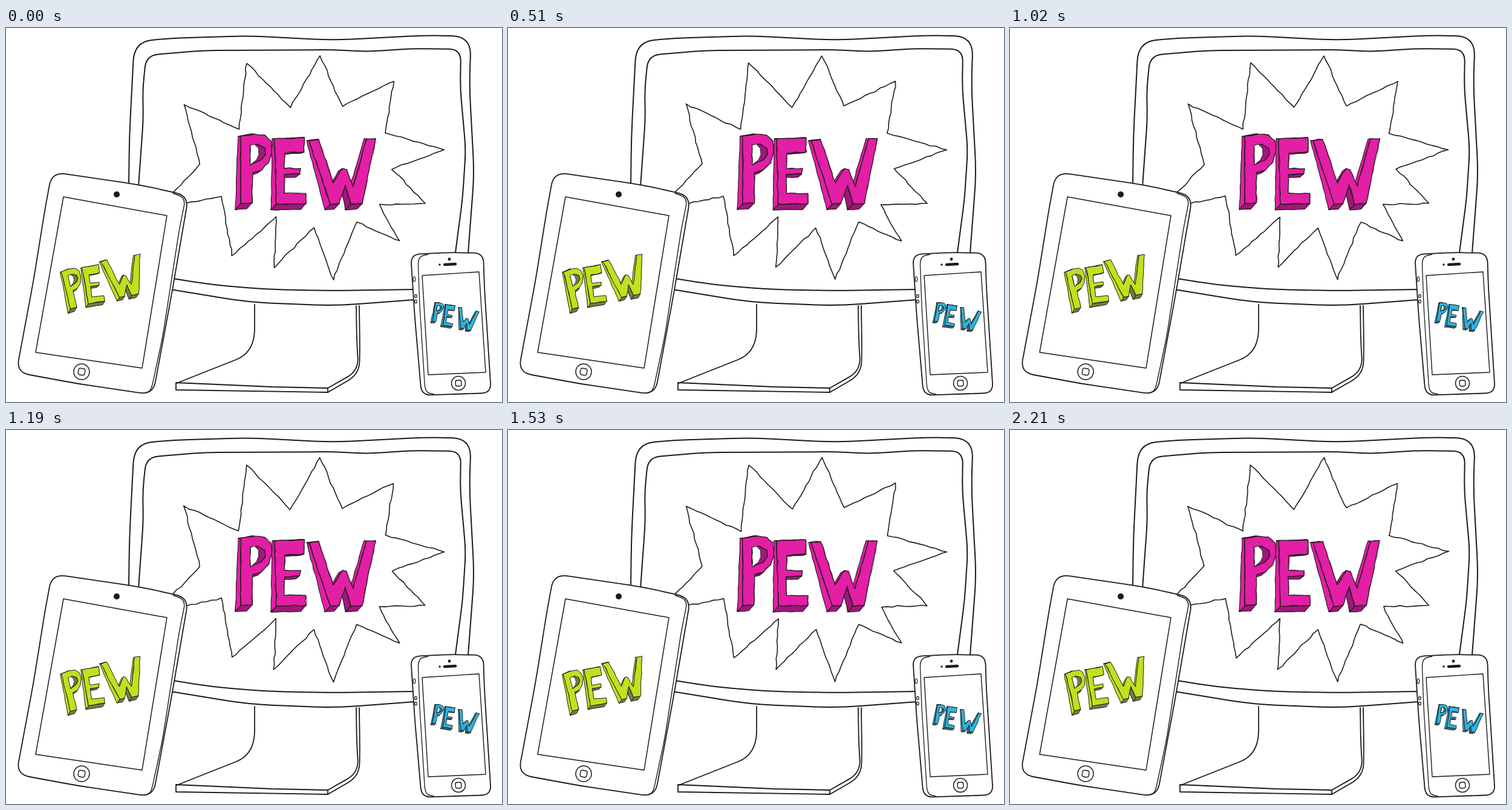
Recreate the animation shown at these times as an HTML page. Size 820 by 618 pixels, loop 2.38 s.

```html
<!DOCTYPE html>
<html lang="en">
<head>
<meta charset="utf-8">
<title>Pew</title>
<style>
  html, body { margin: 0; width: 100%; height: 100%; overflow: hidden; background: #fff; }
  svg { display: block; width: 100vw; height: 100vh; stroke-linejoin: round; stroke-linecap: round; }
</style>
</head>
<body>
<svg id="stage" viewBox="0 0 820 618" role="img" aria-label="PEW"></svg>
<script>
const STEP = 170, STEPS = 14, INK = '#1c1a1b';
const stage = document.getElementById('stage');

function add(tag, attrs) {
  const el = document.createElementNS('http://www.w3.org/2000/svg', tag);
  for (const k in attrs) el.setAttribute(k, attrs[k]);
  return stage.appendChild(el);
}

const parse = s => s.trim().split(/\s+/).map(p => p.split(',').map(Number));

function random(seed) {
  let a = Math.imul(seed + 1, 2654435761);
  return () => {
    a = (a + 0x6D2B79F5) | 0;
    let t = Math.imul(a ^ (a >>> 15), 1 | a);
    t = (t + Math.imul(t ^ (t >>> 7), 61 | t)) ^ t;
    return ((t ^ (t >>> 14)) >>> 0) / 4294967296 - 0.5;
  };
}

// Steady line through a few corners, each rounded by up to `radius`
function outline(points, radius, closed, width, fill = 'none') {
  const p = parse(points), n = p.length;
  const toward = (a, b) => {
    const len = Math.hypot(b[0] - a[0], b[1] - a[1]);
    const t = Math.min(radius / len, 0.5);
    return a.map((v, k) => (v + (b[k] - v) * t).toFixed(1));
  };
  let d = closed ? '' : `M${p[0]}`;
  for (let i = closed ? 0 : 1; i < (closed ? n : n - 1); i++) {
    const from = toward(p[i], p[(i + n - 1) % n]), to = toward(p[i], p[(i + 1) % n]);
    d += `${d ? 'L' : 'M'}${from}Q${p[i]} ${to}`;
  }
  d += closed ? 'Z' : `L${p[n - 1]}`;
  add('path', { d, fill, stroke: INK, 'stroke-width': width });
}

// Shaky closed line: fixed roughness plus a tremble that changes with every step
function rough(pts, amount, seed, step) {
  const still = random(seed), shake = random(seed * 31 + step * 977 + 5);
  const out = [];
  pts.forEach((a, i) => {
    const b = pts[(i + 1) % pts.length];
    const parts = Math.max(1, Math.round(Math.hypot(b[0] - a[0], b[1] - a[1]) / 9));
    for (let j = 0; j < parts; j++)
      out.push(a.map((v, k) => (v + (b[k] - v) * j / parts
        + amount * (still() * (j ? 1 : 0.3) + shake())).toFixed(1)));
  });
  return `M${out.join('L')}Z`;
}

const live = [];
function tremble(rings, amount, width, fill = 'none') {
  const seed = 10 * (live.length + 1);
  const el = add('path', { fill, 'fill-rule': 'evenodd', stroke: INK, 'stroke-width': width });
  live.push(step => el.setAttribute('d',
    rings.map((ring, i) => rough(ring, amount, seed + i, step)).join('')));
}

// Front faces of the block letters, measured from their top left corner
const FACES = {
  P: ['0,0 22,-4 40,-2 50,8 52,24 46,44 34,56 20,60 19,110 0,111', '16,15 28,13 40,20 41,30 34,39 16,47'],
  E: ['0,0 49,-2 49,22 17,24 16,49 43,49 42,58 16,59 16,90 52,91 52,107 3,108'],
  W: ['0,0 16,-2 40,70 55,46 62,48 73,76 95,-3 110,-3 88,104 69,105 60,73 50,104 35,105']
};
const HEIGHT = 110;

// The block's back lies to the left and, further down the letter, also lower
const behind = ([x, y]) => {
  const t = Math.max(0, y / HEIGHT);
  return [x - 4 - 5 * t, y + 10 * t];
};

function letter(name, x, y, turn, scale, main, dark) {
  const c = Math.cos(turn * Math.PI / 180) * scale, s = Math.sin(turn * Math.PI / 180) * scale;
  const place = ([u, v]) => [x + u * c - v * s, y + u * s + v * c];
  const amount = 0.7 + 0.6 * scale, width = 0.85 + 0.25 * scale;
  const rings = FACES[name].map(parse);
  rings.forEach((ring, hole) => ring.forEach((a, i) => {
    const b = ring[(i + 1) % ring.length], side = hole ? -1 : 1;
    const len = Math.hypot(b[0] - a[0], b[1] - a[1]);
    const nx = side * (b[1] - a[1]) / len, ny = -side * (b[0] - a[0]) / len;
    const mid = (a[1] + b[1]) / 2, back = behind([0, mid]);
    if (nx * back[0] + ny * (back[1] - mid) <= 0) return;
    const shaded = hole || ny > 0.6 || mid > HEIGHT * 0.7;
    tremble([[a, b, behind(b), behind(a)].map(place)], amount * 0.6, width, shaded ? dark : main);
  }));
  const front = rings.map(ring => ring.map(place));
  tremble(front, amount, width, main);
  if (scale === 1) tremble(front, amount * 1.6, width * 0.6);
  // Paper shows through the counter, beside its shaded wall
  if (rings[1]) counter(rings[1], place, amount, width, dark);
}

function counter(ring, place, amount, width, dark) {
  tremble([ring.map(place)], amount * 0.5, width, dark);
  const left = Math.min(...ring.map(p => p[0]));
  const open = ring.map(([x, y]) => [left + (x - left) * 0.55, y]);
  tremble([open.map(place)], amount * 0.5, width * 0.7, '#fff');
}

// Monitor
outline('203,257 204,180 212,23 270,17 400,13 540,20 700,12 769,14 766,95 774,240 764,372', 32, false, 2);
outline('219,262 227,150 226,100 232,45 330,37 540,36 600,39 670,34 752,35 751,100 760,200 755,280 743,371', 20, false, 2);
outline('276,414 340,424 430,432 545,434 675,432', 30, false, 2);
outline('272,432 400,453 543,459 676,449', 40, false, 2);
outline('411,457 411,536 350,560 282,587', 50, false, 1.8);
outline('579,459 580,520 583,566 532,595', 22, false, 1.8);
outline('584,459 585,530 584,572 532,602', 22, false, 1.8);
outline('281,586 440,593 532,595 532,602 281,598', 0, true, 1.8);

tremble([parse('294,126 385,167 398,58 470,131 519,46 556,129 641,88 627,174 725,201 638,233 693,290 617,292 650,352 580,321 541,416 509,330 443,396 447,312 374,376 356,278 298,290 276,272 321,225')], 1.5, 1.6);

function homeButton(x, y, r, turn) {
  add('circle', { cx: x, cy: y, r, fill: 'none', stroke: INK, 'stroke-width': 1.5 });
  add('rect', {
    x: x - r * 0.42, y: y - r * 0.42, width: r * 0.84, height: r * 0.84, rx: r * 0.25,
    transform: `rotate(${turn} ${x} ${y})`, fill: 'none', stroke: INK, 'stroke-width': 1.4
  });
}

// Tablet
outline('76,238 220,259 302,277 272,450 243,606 120,588 17,569 45,420 66,290', 22, true, 1.8, '#fff');
outline('276,273 297,281 287,330 259,510 240,599 231,603', 14, false, 1.4);
outline('95,279 266,310 225,562 49,536', 0, true, 1.5);
add('circle', { cx: 183, cy: 275, r: 5, fill: INK });
homeButton(125, 568, 13, 10);

// Phone
outline('669,374 735,371 789,372 791,430 802,603 740,605 687,607 676,480', 16, true, 1.8, '#fff');
outline('698,374 681,378 684,460 693,602 707,605', 14, false, 1.3);
outline('688,409 782,403 793,569 698,573', 0, true, 1.4);
add('path', { d: 'M725 391L743 390', stroke: INK, 'stroke-width': 4.5 });
add('circle', { cx: 733, cy: 382, r: 2.4, fill: INK });
add('circle', { cx: 717, cy: 391, r: 1.7, fill: INK });
homeButton(748, 587, 11.5, -4);
for (const [x, y, r] of [[675, 415, 4], [677.5, 443, 2.6], [677.5, 452, 2.6]])
  add('ellipse', { cx: x, cy: y, rx: 1.8, ry: r, fill: '#fff', stroke: INK, 'stroke-width': 1.2 });

const pink = ['#e31fa5', '#a0177a'], green = ['#c2e01f', '#737d46'], blue = ['#2cb4df', '#4c6b78'];
letter('P', 388, 179, 0, 1, ...pink);
letter('E', 444, 183, 0, 1, ...pink);
letter('W', 501, 186, 0, 1, ...pink);
letter('P', 92, 403, -13, 0.57, ...green);
letter('E', 126, 396, -8, 0.56, ...green);
letter('W', 157, 386, -9, 0.6, ...green);
letter('P', 710, 454, 9, 0.28, ...blue);
letter('E', 727, 457, 10, 0.32, ...blue);
letter('W', 749, 462, 13, 0.31, ...blue);

let shown = -1;
function draw(now) {
  const step = Math.floor(now / STEP) % STEPS;
  if (step === shown) return;
  shown = step;
  live.forEach(update => update(step));
}

const start = performance.now();
function loop() {
  draw(performance.now() - start);
  requestAnimationFrame(loop);
}
loop();
</script>
</body>
</html>
```
